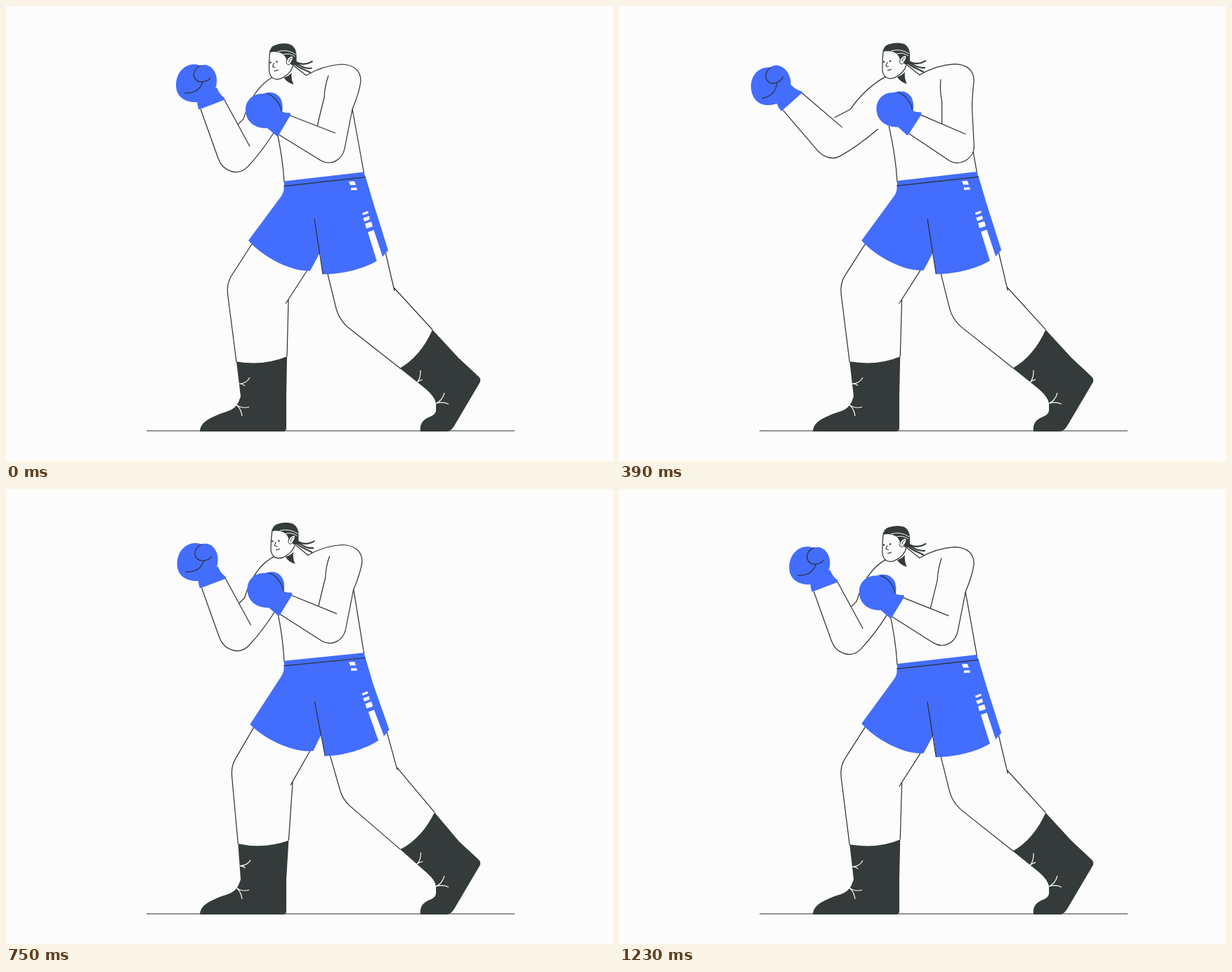
Write an HTML page with a canvas that moves like this. It is 864 by 648 pixels and loops after 1.26 s.

```html
<!DOCTYPE html>
<html lang="en">
<head>
<meta charset="utf-8">
<title>Boxer</title>
<style>
html, body { margin: 0; width: 100%; height: 100%; overflow: hidden; background: #fcfcfc; }
canvas { display: block; width: 864px; height: 648px; }
</style>
</head>
<body>
<canvas id="stage" width="864" height="648"></canvas>
<script>
const ctx = document.getElementById('stage').getContext('2d');
const PAPER = '#fcfcfc', INK = '#343b3a', LINE = '#2c2f30', BLUE = '#436dfd';
const LOOP = 1260, STEP = 30, BEAT = 420;

// Blend two path strings that share the same commands.
const NUM = /-?[\d.]+/g;
const mix = (a, b, p) => {
  const to = b.match(NUM);
  let i = 0;
  return a.replace(NUM, n => (+n + (to[i++] - n) * p).toFixed(2));
};

// A rigid part: its rest pivot moves to a new place and the part turns around it.
const joint = ([px, py], [qx, qy], deg) => {
  const a = deg * Math.PI / 180, c = Math.cos(a), s = Math.sin(a);
  return (x, y) => [qx + (x - px) * c - (y - py) * s, qy + (x - px) * s + (y - py) * c];
};
const bend = (d, part) => d.replace(/(-?[\d.]+) (-?[\d.]+)/g,
  (_, x, y) => part(+x, +y).map(v => v.toFixed(2)).join(' '));

const fill = (d, color) => {
  ctx.fillStyle = color;
  ctx.fill(new Path2D(d));
};
const line = (d, color = LINE, width = 1.2) => {
  ctx.strokeStyle = color;
  ctx.lineWidth = width;
  ctx.stroke(new Path2D(d));
};

const ease = p => (1 - Math.cos(Math.PI * p)) / 2;
const bob = t => ease(2 * t / BEAT);
const track = (t, ...keys) => {
  const i = keys.findIndex(k => k[0] > t);
  if (i < 0) return keys[keys.length - 1][1];
  if (i === 0) return keys[0][1];
  const [t0, v0] = keys[i - 1], [t1, v1] = keys[i];
  return v0 + (v1 - v0) * ease((t - t0) / (t1 - t0));
};

function legs(p) {
  const m = (a, b) => mix(a, b, p);
  // front leg
  line(m('M352 336 L321 384 Q314 395 315.5 410 L328 507', 'M360 338 L338.5 388 Q336 395 336 406 L336 502'));
  line(m('M431 373 L398 424 M402 418 L400 499', 'M444 360 L422.5 416 M422.5 416 L408 504'));
  fill(m('M328 506.5 Q367 513 400 499 L399 556', 'M336 502 Q371 513 408 504 L399 558')
    + 'L399 601 Q399 606 394 606 L276 606 Q276 594 293 586 Q305 580 316 577 Q327 573 331 564 L334 556 Z', INK);
  line(m('M332 538 Q342 538 347 529 M332 538 Q337 538 340 541',
         'M335 533 Q345 534 351 527 M335 533 Q340 534 342 537'), PAPER);
  line('M328 568 Q336 574 346 571 M328 568 Q335 574 336 584', PAPER);
  // rear leg
  line(m('M457 378 L470 431 Q474 446 486 457 L561 516', 'M468 371 L489 425 Q491 431 497 437 L562.5 507'));
  line(m('M539 346 L553 406 M552 401 L607 461', 'M545 330 L566.5 385 M566.5 385 L617 459'));
  fill(m('M597 545 L560.5 516 Q590 499 607 461 L644 501', 'M604 551 L562.5 507 Q597 493 617 459 L648 505')
    + 'L673 528 Q677 532 674 537 L638 598 Q633 606 627 606 L590 606 Q588 592 601 586 Q612 582 612 576 L612 566 '
    + m('Q611 557 597 545', 'Q613 560 604 551') + 'Z', INK);
  line(m('M585 536 Q590 532 590 519 M585 536 Q588 533 593 532',
         'M584 530 Q591 526 592 514 M584 530 Q589 527 594 527'), PAPER);
  line('M612 566 Q621 562 624 551 M612 566 Q621 563 630 567', PAPER);
}

function shorts(h, p) {
  const waist = mix('M509 236.5 L396 249.5 L395.5 259 Q396 265 391 272', 'M510 228.3 L396 237.5 L395.5 247 Q396 253 391 262', h);
  fill(waist + mix(
    'L345 334 C364 356 405 379 433 377 L447 351 L451 382 C480 382 510 374 528 363 L536 357 L544 348 L523 281 L512 244 Z',
    'L353 338 C375 355 420 371 448 363 L453 346 L462 376 C485 375 515 362 536 346 L543 340 L549 330 L521 268 L512 236 Z', p), BLUE);
  fill(mix('M488 250 L496 249.5 L498 255 L490 255 Z M491 259 L499 258.5 L500 262 L491 262.5 Z',
           'M488 241 L496.5 240.5 L498 245.5 L490 246 Z M491 250 L499 249.5 L500 253 L491 253.5 Z', h), PAPER);
  fill(mix(
    'M507 295 L515 292 L516 295 L508 298 Z M508.5 302 L517 299 L518 304 L510 307 Z M511 310 L520 307 L522 314 L513 317 Z M515 322 L523.5 319 L536 357 L528 364 Z',
    'M505.5 282 L513 278 L514.5 281 L507 285 Z M508 288.5 L516 285 L518 289 L510 292.5 Z M512 296 L520 292 L523 299 L514.5 302.5 Z M517 307 L525 303.5 L543 340 L536 347 Z', p), PAPER);
  line(mix('M395.5 256.7 L512 243.7', 'M395.5 244.5 L512 235.5', h));
  line(mix('M439 303.5 L451 382', 'M439.5 300 L462 376', p));
}

function farArm(t, b) {
  const punch = track(t, [100, 0], [290, 1], [475, 0]);
  const upper = joint([375, 125], [375 + 3.5 * b, 125 - 13.5 * b], 40 * punch);
  const fore = joint([325, 212], upper(325, 212), -48 * punch);
  const fist = joint([292, 139.5], fore(292, 139.5), track(t, [165, 0], [300, -25], [520, 0]));

  line(bend('M320 179 L338 161', upper) + mix('Q351 117 ', 'Q355 103 ', b)
    + mix('380 101', '385 89.5', b));
  const k = 20 * (1 - .8 * punch);   // elbow handles shorten as the arm opens
  const edge = bend(`M277 147 L302 217 C${302 + .336 * k} ${217 + .942 * k}`, fore) + ' '
    + bend(`${344 - .69 * k} ${229 + .72 * k} 344 229 Q364 208 384 176`, upper);
  fill(edge + bend('L347 200 L310 132', fore) + 'Z', PAPER);
  line(edge);
  line(bend('M310 132 L347 200', fore));

  fill(bend('M274 147 Q272 140 272 134 L300 116 Q304 126 311 131 Q312 133 310 134 L276 147 Z', fore), BLUE);
  fill(bend('M242 113 C242 95 254 83 268 83 Q273 83 277 85 C287 80 300 90 300 106 Q300 113 298 118 L301 126 L273 137 C256 138 242 130 242 113 Z', fist), BLUE);
  line(bend('M278 84.5 Q268 88 267 98 Q269 109 280 108 Q288 107 291 102 M254 124 Q269 125 276 116 Q279 112 280 108', fist));
}

function nearArm(t, h) {
  const lag = 5.07 * (bob(t - 45) - .11) - 5.37 * h;
  const turn = lag + track(t, [30, 0], [225, 6.6], [395, 1.5], [560, 0]);
  const upper = joint([482, 107], [482 + 4 * h, 107 - 9 * h],
    track(t, [30, 0], [225, 13.5], [395, -14], [560, 0]));
  const fore = joint([463, 202], upper(463, 202), turn);
  const fist = joint([393, 163], fore(393, 163), turn + track(t, [30, 0], [225, -20], [395, -1], [560, 0]));

  const edge = mix('M427 99 Q450 85 477 83 C495 83 505 92 505 107 Q503 123 ',
                   'M432 88 Q458 74 480 74 C499 74 510 84 510 99 Q507.5 114 ', h)
    + bend('493 147 L482 203 C478.5 220', upper) + ' ' + bend('462 228 448 220 L388 183', fore);
  fill(edge + 'Z', PAPER);
  line(bend('M459 99 Q453.7 113.6 453 130 L442 175', upper));
  fill(bend('M403 155.5 L469 181 L448 220 L388 183 Z', fore), PAPER);
  line(edge);
  line(bend('M403 155.5 L469 181', fore));

  fill(bend('M372 174 L388 148 Q396 153 404 152 Q406 154 404 157 L388 184 Q386 187 384 184 Z', fore), BLUE);
  fill(bend('M341 148 C341 134 352 124 366 125 Q368 124 371 123.5 Q384 121 391 132 Q395 141 393 150 L396 160 L384 175 L372 174 C355 175 341 165 341 148 Z', fist), BLUE);
  line(bend('M371 125 C380 126 390 138 392.5 150', fist));
}

function head(b) {
  const part = joint([395, 80], [395.5 + 6.3 * b, 80 - 12.3 * b], 3 * b);
  const at = d => bend(d, part);
  fill(at('M395 102 Q402 100 406 95 Q405 104 409 112 Q399 109 395 102 Z'), INK);
  const face = at('M375.5 63 Q374 74 374 82 L374 92 Q374.5 99 379 102.5 Q387 107 395 101 Q402 97 406 90 L408 85');
  fill(face + at('L410 70 Z'), PAPER);
  line(face);
  line(at('M409 85 L427 99'));
  line(at('M411 79 C418 84 428 84 436 78.5 M411 81 C419 85 424 90 435 88.5 M411 83 C417 89 424 90 433 95'), INK, 2.1);
  fill(at('M375 66 Q375 58 383 55.5 Q395 51.5 405 55 Q413 60 413 71 L413 82 Q411 86 406 84 L399 77 Q397 69 389 66.5 Q382 64.5 375 66 Z'), INK);
  line(at('M386 65 Q400 61 412 69 M394 69 Q403 66.5 411 72'), PAPER, 1);
  const ear = at('M398.5 81 Q399 73 407 71 Q410 74 404 82 Q401 86 398.5 81 Z');
  fill(ear, PAPER);
  line(ear, LINE, 1);
  line(at('M402 80 Q402 75 406 74'), LINE, 1);
  line(at('M381 81 L379 86 Q380 88 383 87 M381 92.5 Q384 92.5 387 91'), LINE, 1.1);
  for (const [x, y] of [part(376, 80.5), part(385, 79.5)]) {
    ctx.fillStyle = LINE;
    ctx.beginPath();
    ctx.arc(x, y, 1.2, 0, 7);
    ctx.fill();
  }
}

function draw(t) {
  const h = bob(t), b = bob(t - 8);
  const p = h * (.6 + .4 * h);   // legs straighten faster near the top
  ctx.fillStyle = PAPER;
  ctx.fillRect(0, 0, 864, 648);
  line('M200 605 L724 605');
  legs(p);
  farArm(t, b);
  line(mix('M384 171 Q394 215 396 251', 'M388 168 Q395 205 396 239', h));
  line(mix('M493 147 L509.5 238', 'M496 128 L510 230', h));
  shorts(h, p);
  nearArm(t, h);
  head(b);
}

ctx.lineJoin = 'round';
function tick() {
  const t = performance.now() % LOOP;
  draw(Math.floor(t / STEP) * STEP);
  requestAnimationFrame(tick);
}
tick();
</script>
</body>
</html>
```
